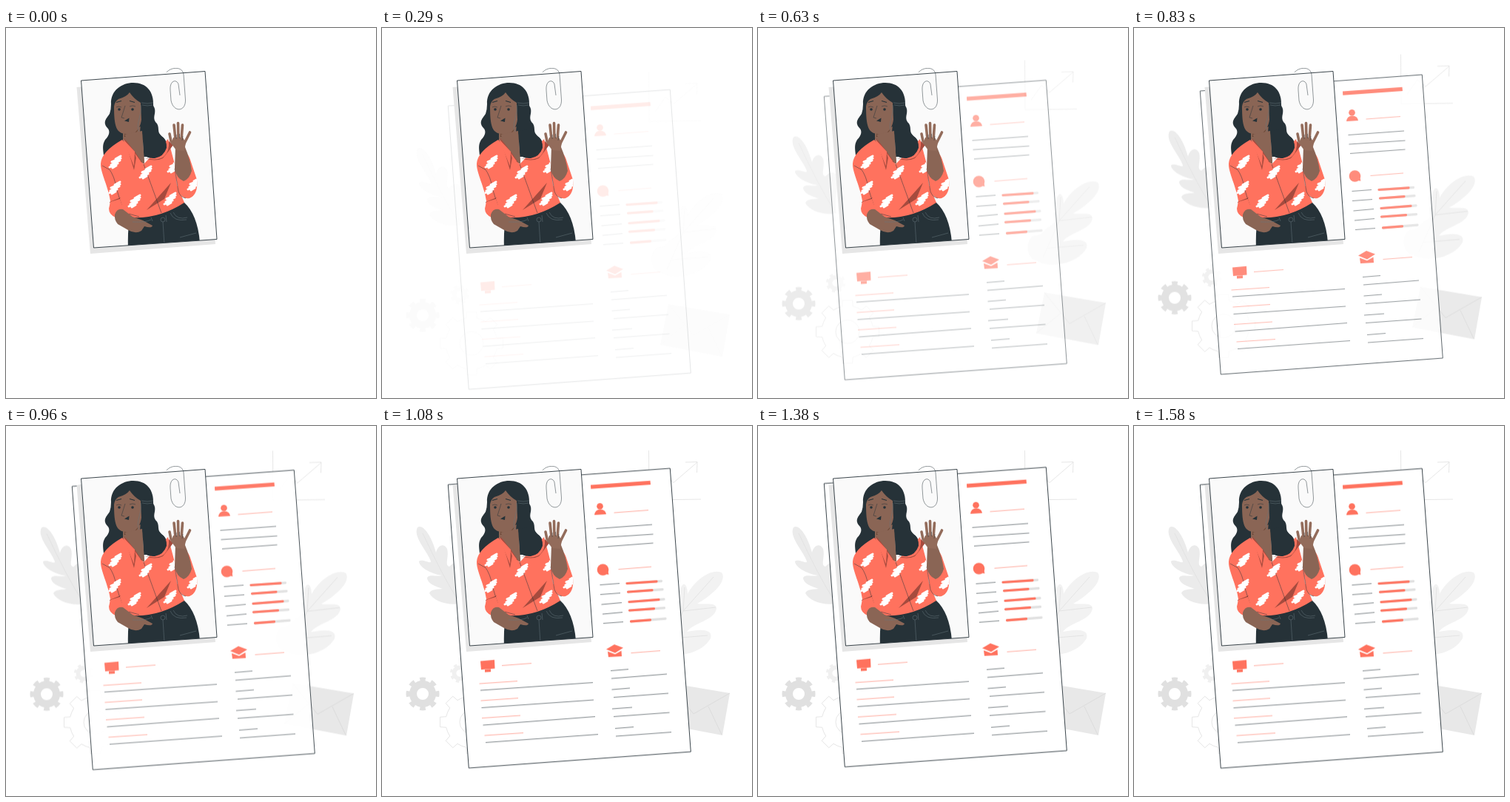
Recreate the animation shown at these times as an HTML page without scripts. Size 500 by 500 pixels, loop 1.62 s.

```html
<!DOCTYPE html>
<html lang="en">
<head>
<meta charset="utf-8">
<title>Résumé</title>
<style>
html, body { margin: 0; height: 100%; overflow: hidden; background: #fff; }
svg { display: block; width: 100%; height: 100%; }
.scene { animation: rise 1620ms cubic-bezier(.5, 0, .55, 1) infinite; }
.page { animation: slide 1620ms cubic-bezier(.33, -.01, .485, 1.38) infinite; }
@keyframes rise {
  from { opacity: 0; transform: translateY(30px); }
  65%, to { opacity: 1; transform: none; }
}
@keyframes slide {
  from { opacity: 0; transform: translateY(30.5px); }
  98%, to { opacity: 1; transform: translateY(.5px); }
}
path { stroke-linejoin: round; }
.line { fill: none; stroke: #263238; stroke-width: .6; }
.thin { fill: none; stroke: #263238; stroke-width: .5; }
.pale { fill: none; stroke: #e0e0e0; stroke-width: .8; }
.edge { stroke: #263238; stroke-width: .9; }
.bar { fill: none; stroke: #e0e0e0; stroke-width: 3.2; stroke-linecap: round; }
.red { stroke: #ff725e; }
.coral { fill: #ff725e; }
.shade { fill: #a64b3e; }
.dark { fill: #263238; }
.skin { fill: #8a6555; }
.arm { fill: #936c5b; }
.finger { fill: none; stroke: #936c5b; stroke-width: 3.6; stroke-linecap: round; }
.seam { stroke: #66767d; }
.brush { fill: none; stroke: #fff; stroke-width: 3; stroke-linecap: round; }
</style>
</head>
<body>
<svg viewBox="0 0 500 500">
<defs>
  <path id="photo" d="M101.500 71 269 58.500 285 285.500 118.500 297Z"/>
  <path id="shirt" d="M157 151Q129 167 128 183C127 194 139 216 141 234Q139 245 147 254L168 256Q205 259 241 236L231 212 228 184 219 150 186 184Z"/>
  <path id="cuff" d="M232 166Q245 163 250 181L258 205Q260 225 248 230 239 232 233 221L228 190Z"/>
  <clipPath id="frame"><use href="#photo"/></clipPath>
  <clipPath id="torso"><use href="#shirt"/></clipPath>
  <clipPath id="sleeve"><use href="#cuff"/></clipPath>
  <path id="tooth" d="M-13.4-32.3-7.3-34.2-6.7-42.5H6.7L7.3-34.2 13.4-32.3"/>
  <path id="stroke" d="M0-4 7-8M-5 0 7-5M-6 4 6-2M-8 7 3 2M-4 8 1 5"/>
  <g id="gear" fill="none">
    <circle r="13" stroke-width="10"/>
    <circle r="19.5" stroke-width="6" pathLength="16" stroke-dasharray="1" stroke-dashoffset=".5"/>
  </g>
</defs>

<g class="scene">
  <path class="pale" d="M360.500 33 361 100 431 99M369 87 383 67 394 76.500 426 49M410 49 426 48.500 425.500 63"/>
  <path fill="#ebebeb" d="M48 137C54 132 66 145 73 171C75 162 83 157 88 166C91 177 84 188 91 190C99 181 107 184 108 194C109 205 102 222 106 240C87 243 69 236 64 226C66 220 75 221 82 220C73 217 61 213 61 205C64 200 74 204 81 202C67 200 50 191 50 183C54 179 66 187 66 183C62 170 41 149 48 137Z"/>
  <path class="pale" d="M55 145Q82 203 103 236"/>
  <path fill="#f2f2f2" d="M459 198C443 192 421 211 413 227C413 214 407 209 404 219C401 239 409 247 395 257C384 262 386 270 373 270C361 274 361 302 377 304C390 314 430 311 444 287C448 274 430 274 412 278C422 265 449 263 452 247C452 237 436 242 426 240C441 232 468 211 459 198Z"/>
  <path class="pale" d="M385 300 407 250 448 204M407 250 451 245M392 287 440 283M407 250 409 218"/>
  <path fill="#e8e8e8" d="M387 347 470 361 460 418 376 402Z"/>
  <path class="pale" style="stroke:#d8d8d8" d="M387 347 421 389 470 361M441 379 459 417M376 402 409 375"/>
  <use href="#gear" x="55" y="362" stroke="#e0e0e0"/>
  <use href="#gear" transform="translate(105 334) rotate(15) scale(.58)" stroke="#f0f0f0"/>
  <g class="pale" transform="translate(121 400)">
    <circle r="16"/>
    <use href="#tooth"/>
    <use href="#tooth" transform="rotate(45)"/>
    <use href="#tooth" transform="rotate(90)"/>
    <use href="#tooth" transform="rotate(135)"/>
    <use href="#tooth" transform="rotate(180)"/>
    <use href="#tooth" transform="rotate(225)"/>
    <use href="#tooth" transform="rotate(270)"/>
    <use href="#tooth" transform="rotate(315)"/>
  </g>
</g>

<g class="page">
  <path class="edge" fill="#fff" d="M89.300 79 389.300 57 417.300 440 117.300 462Z"/>
  <g class="coral">
    <path d="M282 79.500 362.500 73.700 363 79 282.300 84.700Z"/>
    <circle cx="294.500" cy="108.300" r="4.300"/>
    <path d="M287 120Q288 112.500 295 112.500T303 119Z"/>
    <circle cx="298.500" cy="194" r="7.800"/>
    <path d="M305 195 306.500 200.500 300 200Z"/>
    <path d="M303 301.500 314 295 326 299.500 315 306.500Z"/>
    <path d="M305 304.500 315 308.300 323.500 303.500 324 311 306 312Z"/>
    <path d="M133 317.500 152 315.700 152.500 327.500 134 329ZM139 329 147 328.300V332L139 332.600Z"/>
  </g>
  <path class="line red" d="M313.500 117 360 113.500M319.500 193.500 364 190M336.500 306.500 376 303.500M162 323.500 202 320.500M131.500 348 183 344.500M133.500 371 184 367.500M135 394.500 187 391M138.500 418 191 414.500"/>
  <path class="line" d="M289.500 138.500 365 133M290.500 151 366.500 146M292 163.500 366.500 158M294.500 214.500 321 212.500M295 227.500 322 225.500M296.500 241 324 238.500M298 254 325 251.500M299 266.500 326 264.500"/>
  <path class="line" d="M309 330.500 333 328.500M310 341 385 335M310.500 356 335 354M313 366.500 387 361M311 382 338 380M313 392.500 388.500 387M315 408.500 340 406.500M316 419 391 413.500"/>
  <path class="line" d="M133 357 285 346.500M134.500 380.500 286 370M136.500 404 288 392.500M140 427.500 292 416.500"/>
  <path class="bar" d="M331 212.500 377.500 209.300M332.500 224 379 220.700M334 237.500 381 233.800M334.500 249 381.500 245.700M336.500 263.800 383 260.200"/>
  <path class="bar red" d="M331 212.500 371 209.800M332.500 224 365 221.700M334 237.500 374 234.400M334.500 249 367.500 246.700M336.500 263.800 362.500 261.800"/>
</g>

<path fill="#e6e6e6" d="M95.500 80 264 67 283 292 114 305Z"/>
<use href="#photo" fill="#fafafa"/>
<g clip-path="url(#frame)">
  <!-- hair and face -->
  <path class="dark" d="M142 103C141 84 157 74 172 74C190 74 200 86 199 105C205 113 197 120 202 127C209 133 203 141 210 146C218 151 220 161 213 169C206 178 195 178 186 172L157 154Q148 165 132 172C131 162 130 158 134 151C140 145 141 139 137 135C130 127 136 122 140 116Q142 110 142 103Z"/>
  <path class="skin" d="M158 137 184 133 187 184 173 177 158 152Z"/>
  <path fill="#63402f" d="M160 143Q172 147 179 136Q175 147 160 147Z"/>
  <path class="skin" d="M146 106Q147 99 152 96 163 93 167 87 173 96 182 101L183 124Q181 142 163 143C149 143 146 133 146 106Z"/>
  <path class="dark" d="M182 101C189 122 177 134 183 150Q188 166 186 174L202 174 199 103Z"/>
  <path class="thin seam" d="M182 104C184 117 176 127 179 138S187 153 185 168M184 104Q191 106 198 104M183 101Q191 103 199 101"/>
  <path class="line" style="stroke-width:1.300" d="M149 100.500 156 98.500M167 98.500 174 100.500"/>
  <path class="dark" d="M160 125.500 166.500 121.500 166 127Z"/>
  <circle class="dark" cx="153" cy="110" r="1.800"/>
  <circle class="dark" cx="171" cy="110" r="1.800"/>
  <path class="thin" d="M161 105 156 121 160 122M149 107Q152 105 156 107M167 106Q171 104 175 106"/>

  <!-- trousers and shirt -->
  <path class="dark" d="M168 255Q207 257 240 235Q259 252 262 290L165 298Q164 271 168 255Z"/>
  <use href="#shirt" class="coral"/>
  <path class="skin" d="M172 166 160 144 184 139 187 182 182 181Z"/>
  <path class="shade" d="M160 149 173 192 176 175 185 183 174 167ZM190 246 223 209 214 231ZM140 235 155 229 151 234 141 237ZM188 176Q207 180 214 173T220 153L226 158Q218 169 212 176 202 181 188 176Z"/>
  <path class="coral" d="M158 150 173 187 174 167ZM174 169 182 180 178 183Z"/>
  <path class="dark" d="M184 139Q188 158 186 168 190 177 201 176 213 174 217 162 218 152 210 146L202 136Z"/>
  <path class="thin" d="M186 184 210 250M139 190Q147 201 149 216L156 239M130 186 139 191M166 251 180 255"/>
  <g class="brush" clip-path="url(#torso)">
    <use href="#stroke" x="148" y="181"/>
    <use href="#stroke" x="189" y="195"/>
    <use href="#stroke" x="147" y="216"/>
    <use href="#stroke" x="174" y="234"/>
    <use href="#stroke" x="222" y="231"/>
    <use href="#stroke" x="227" y="187"/>
  </g>
  <use href="#cuff" class="coral"/>
  <g class="brush" clip-path="url(#sleeve)"><use href="#stroke" x="254" y="211"/></g>
  <path class="thin" d="M228 190 233 221Q236 229 243 230"/>

  <!-- raised hand -->
  <path class="skin" d="M229 160 242 161Q249 178 251 193 248 204 240 207 230 203 228 190Z"/>
  <path class="arm" d="M226 148 239 148 243 155 241 166 230 165 223 156Z"/>
  <path class="finger" d="M221 143 223 153 230 160M227 131 229 150M232.500 128.500 233 150M238.500 131 237 151M248.500 141 239 160"/>
  <path class="thin" d="M230 150V144M234.500 149V143M238 152 239 146"/>

  <!-- lowered arm -->
  <path class="coral" d="M141 235 154 231 158 244Q147 246 148 256 139 252 139 244Z"/>
  <path class="skin" d="M147 252Q150 243 158 245L171 255 185 260 198 267Q197 271 187 268L183 274Q175 279 165 273L151 265Q146 259 147 252Z"/>
  <path class="thin seam" d="M171 262Q189 263 196 259M196 256 198 261M216 253 217 262M222 250Q227 262 244 259M226 249Q231 260 245 256M212 262 214 293M235 283 257 277"/>
  <circle class="thin seam" cx="212" cy="259" r="3"/>
</g>
<use href="#photo" class="edge" fill="none"/>
<path class="thin" d="M217 60C222 53 239 51 240 63L242.500 97C243 114 226 114 223 98L222 84C221 70 231 69 233 76L235 91"/>
</svg>
</body>
</html>
```
